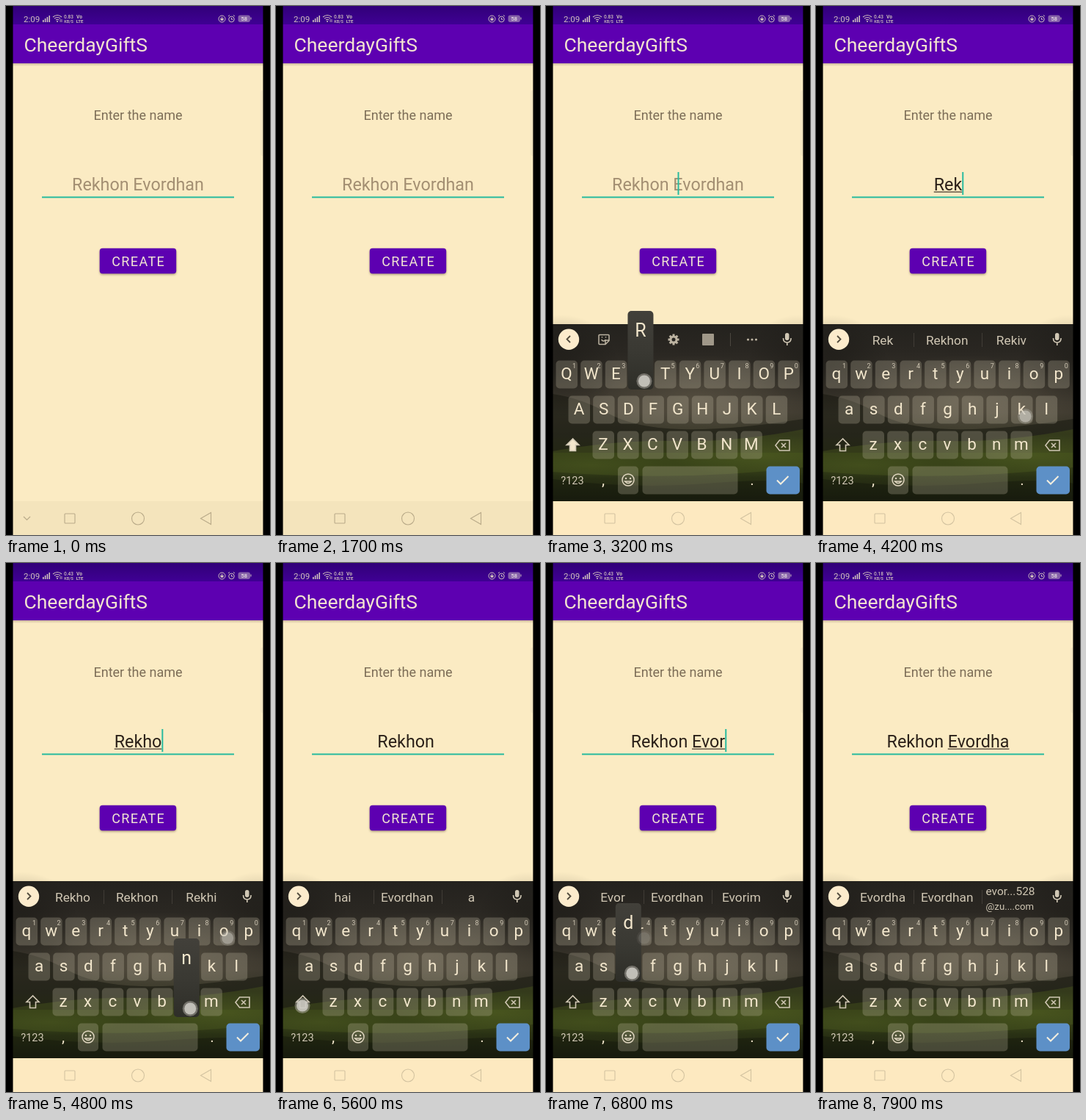
Recreate the animation shown at these times as an HTML page with a canvas. Size 360x720 px, loop 8 s.

```html
<!DOCTYPE html>
<html lang="en">
<head>
<meta charset="utf-8">
<title>Greeting form</title>
<style>
html, body { margin: 0; width: 100%; height: 100%; overflow: hidden; background: #000; }
canvas { display: block; width: 360px; height: 720px; }
</style>
</head>
<body>
<canvas id="stage" width="360" height="720"></canvas>
<script>
const ctx = document.getElementById('stage').getContext('2d');
const LOOP = 8000;
const FONT = 'Roboto, sans-serif';
const CREAM = '#f2e6cc', ICON = '#d0c7b4', TEAL = '#2abb9f', PURPLE = '#5d00b1';
const FIRST = 'Rekhon', LAST = 'Evordhan';
const HINT = FIRST + ' ' + LAST;
const HOLD = 100;
const SLIDE_START = 1750;

// Touch-down times; a letter is committed when its key is released.
const taps = [
  [2750, '⇧'], [3150, 'R'], [3600, 'e'], [4050, 'k'], [4350, 'h'],
  [4600, 'o'], [4780, 'n'], [4950, ' '], [5550, '⇧'], [5850, 'E'],
  [6080, 'v'], [6290, 'o'], [6500, 'r'], [6750, 'd'], [7000, 'h'], [7250, 'a']
].map(([at, key]) => ({ at, key }));

const rows = [['qwertyuiop', 28, 501], ['asdfghjkl', 45, 549], ['zxcvbnm', 78, 597]];
const keys = {};
for (const [letters, x0, y] of rows)
  [...letters].forEach((c, i) => { keys[c] = { x: x0 + i * 33.65, y }; });
keys['⇧'] = { x: 31, y: 593 };
keys[' '] = { x: 196, y: 640 };

function text(s, x, y, size, color, align = 'center', weight = 400) {
  ctx.font = `${weight} ${size}px ${FONT}`;
  ctx.textAlign = align;
  ctx.fillStyle = color;
  ctx.fillText(s, x, y);
}

function rect(x, y, w, h, color) {
  ctx.fillStyle = color;
  ctx.fillRect(x, y, w, h);
}

function band(y, h, color) {
  rect(9, y, 342, h, color);
}

function box(x, y, w, h, r, color) {
  ctx.beginPath();
  ctx.roundRect(x, y, w, h, r);
  ctx.fillStyle = color;
  ctx.fill();
}

function disc(x, y, r, color) {
  ctx.beginPath();
  ctx.arc(x, y, r, 0, 7);
  ctx.fillStyle = color;
  ctx.fill();
}

function ring(x, y, r, color, width = 1) {
  ctx.beginPath();
  ctx.arc(x, y, r, 0, 7);
  ctx.strokeStyle = color;
  ctx.lineWidth = width;
  ctx.stroke();
}

function stroke(path, color, width = 1.5) {
  ctx.strokeStyle = color;
  ctx.lineWidth = width;
  ctx.stroke(new Path2D(path));
}

function shape(path, color) {
  ctx.fillStyle = color;
  ctx.fill(new Path2D(path));
}

function fade(y0, y1, ...stops) {
  const g = ctx.createLinearGradient(0, y0, 0, y1);
  stops.forEach(([at, color]) => g.addColorStop(at, color));
  return g;
}

// Soft elliptical patch that fades out towards its rim.
function glow(x, y, rx, ry, rgb, alpha) {
  ctx.save();
  ctx.translate(x, y);
  ctx.scale(rx, ry);
  const g = ctx.createRadialGradient(0, 0, 0, 0, 0, 1);
  g.addColorStop(0, `rgba(${rgb},${alpha})`);
  g.addColorStop(1, `rgba(${rgb},0)`);
  disc(0, 0, 1, g);
  ctx.restore();
}

function stateAt(t) {
  const s = { value: '', shift: false, changed: 100, popup: null };
  for (const { at, key } of taps) {
    if (t < at) break;
    if (t < at + HOLD) {
      if (key !== '⇧' && key !== ' ') s.popup = key;
      break;
    }
    if (key === '⇧') s.shift = true;
    else {
      s.value += key;
      s.shift = false;
      s.changed = at + HOLD;
    }
  }
  s.cursor = t >= 100 && (t - s.changed) % 1000 < 500;
  return s;
}

function statusBar(t) {
  const ink = '#cfc0bd';
  band(0, 25, fade(0, 25, [0, '#310078'], [1, '#3f0094']));
  text('2:09', 24, 22, 11.5, ink, 'left');
  for (let i = 0; i < 4; i++) rect(50 + i * 2.8, 19 - i * 2, 1.6, 3 + i * 2, ink);
  stroke('M64 15q6-5 12 0M66 17q4-3 8 0M68 19q2-1.5 4 0', ink, 1.1);
  disc(70, 21, 1, ink);
  if (t < 1900 || t > 3700) stroke('M74 18v4m2-4v4', ink, 0.8);
  const speed = t < 3700 ? '0.83' : t < 7400 ? '0.43' : '0.18';
  text(speed, 85.5, 17, 6.5, ink, 'center', 500);
  text('KB/S', 85.5, 23, 5.5, ink, 'center', 500);
  text('Vo', 100, 17, 6.5, ink, 'center', 700);
  text('LTE', 100.5, 23, 6, ink, 'center', 700);
  ring(294.5, 17.5, 4.5, ink);
  box(292.5, 16.8, 4, 3, 0.5, ink);
  ring(294.5, 16.5, 1.3, ink, 0.7);
  ring(307.5, 18, 3.8, ink);
  stroke('M307.5 16v2.2h2M303 14l2-1.6m7 1.6-2-1.6', ink, 1);
  box(316.5, 12.5, 16.5, 9.5, 3, 'rgba(207,192,200,.5)');
  text('58', 324.8, 20, 7.5, '#e6dbe0', 'center', 500);
  rect(333.5, 15.5, 1, 3, ink);
}

function form(s) {
  band(25, 695, '#fbebc3');
  band(78, 4, fade(78, 82, [0, '#cdb99c'], [1, '#fbebc3']));
  band(25, 53, PURPLE);
  text('CheerdayGiftS', 24.5, 62, 26.5, '#f3e4d0', 'left');
  text('Enter the name', 180, 154.5, 18, '#7c6d57');
  box(347.5, 115, 3, 89, [2, 0, 0, 2], '#f1e3bf');

  rect(49, 259.3, 262, 2, TEAL);
  const shown = s.value || HINT;
  ctx.font = `400 23.3px ${FONT}`;
  const width = ctx.measureText(shown).width;
  const left = 180 - width / 2;
  text(shown, left, 251, 23.3, s.value ? '#2b2119' : '#a38f72', 'left');
  const word = s.value.split(' ').pop();
  if (word) {
    const w = ctx.measureText(word).width;
    rect(left + width - w, 252.5, w, 1.2, '#3d3228');
  }
  if (s.cursor) rect(s.value ? left + width : 179.5, 226, 2, 31, TEAL);

  ctx.save();
  ctx.shadowColor = 'rgba(60,40,20,.4)';
  ctx.shadowBlur = 3;
  ctx.shadowOffsetY = 1.5;
  box(127.7, 329.8, 104.5, 34.4, 4, PURPLE);
  ctx.restore();
  ctx.letterSpacing = '1.4px';
  text('CREATE', 180.7, 354.2, 18, '#f3e6d3');
  ctx.letterSpacing = '0px';
}

function navBar(t) {
  const open = t > SLIDE_START;
  band(674, 46, open ? '#fde9c0' : '#f4e4bc');
  const ink = open ? '#d3c3a0' : '#b9aa89';
  if (t < 1500) stroke('M24 695l4.5 4.5 4.5-4.5', ink, 1.2);
  stroke('M81 691h12q1 0 1 1v11q0 1-1 1h-12q-1 0-1-1v-11q0-1 1-1z', ink, 1.1);
  ring(180, 697.5, 8.5, ink, 1.1);
  stroke('M265.5 697.5l14-8v16z', ink, 1.1);
}

function landscape() {
  band(433, 241, fade(433, 674,
    [0, '#24221e'], [0.16, '#2a2722'], [0.32, '#36322a'], [0.5, '#413c31'],
    [0.62, '#353526'], [0.72, '#303816'], [0.84, '#2c3415'], [1, '#1b1f10']));
  glow(205, 535, 150, 60, '118,108,88', 0.4);
  shape('M9 528q40 6 75 26t100 22 167-14v46H9z', 'rgba(30,30,21,.65)');
  shape('M9 606q90-16 170-14t172-16v52q-170 20-342 6z', 'rgba(72,86,30,.45)');
  glow(300, 612, 130, 30, '92,108,38', 0.4);
  glow(60, 625, 100, 18, '86,100,36', 0.3);
  glow(20, 490, 80, 70, '16,15,12', 0.4);
  glow(345, 480, 70, 60, '16,15,12', 0.3);
  shape('M9 644q110 14 210 6t132 0v24H9z', 'rgba(18,21,12,.4)');
}

function mic() {
  box(326, 445, 5.5, 10, 3, ICON);
  stroke('M323.5 452q0 6 5.3 6t5.3-6M328.8 458v4', ICON, 1.6);
}

function toolbar() {
  const ink = '#bdb4a2';
  stroke('M73 447.5q-1 0-1 1v11q0 1 1 1h8l5-5v-7q0-1-1-1zM86 455h-5v5', ink);
  stroke('M75.5 454q3 4 6 0M76.5 450v1.5m5-1.5v1.5', ink, 1.3);
  text('GIF', 126, 458.5, 12.5, ink, 'center', 700);
  ctx.save();
  ctx.translate(174, 454);
  ring(0, 0, 4, ink, 3);
  for (let i = 0; i < 8; i++) {
    ctx.rotate(Math.PI / 4);
    rect(-1.5, -7.5, 3, 3, ink);
  }
  ctx.restore();
  box(213, 446, 16, 16, 1, '#a09889');
  rect(251, 445, 1, 18, 'rgba(220,210,190,.2)');
  [275.5, 281, 286.5].forEach(x => disc(x, 454, 1.6, ink));
}

function suggestions(value) {
  const word = value.split(' ').pop();
  let words;
  if (!word) words = ['hai', LAST, 'a'];
  else if (value.includes(' ')) words = [word, LAST, word.length < 5 ? 'Evorim' : 'Evordi'];
  else words = [word, FIRST, word.length < 4 ? 'Rekiv' : 'Rekhi'];
  [133, 226].forEach(x => rect(x, 445, 1, 19, 'rgba(220,210,190,.14)'));
  if (word.length === 7) {
    text('evor...528', 231.5, 451.5, 15.5, ICON, 'left');
    text('@zu....com', 231.5, 472, 13.2, ICON, 'left');
    words.pop();
  }
  words.forEach((w, i) => text(w, 91 + i * 87.7, 460.5, 17.3, ICON));
}

function keyboard(s) {
  landscape();
  disc(31, 453.7, 14.2, '#fcebcc');
  if (s.value) {
    stroke('M29 449l4.5 4.5-4.5 4.5', '#514a3d', 1.8);
    suggestions(s.value);
  } else {
    stroke('M33 449l-4.5 4.5 4.5 4.5', '#514a3d', 1.8);
    toolbar();
  }
  mic();

  const face = 'rgba(207,200,177,.25)';
  for (const [letters] of rows) {
    [...letters].forEach((c, i) => {
      const { x, y } = keys[c];
      box(x - 14.5, y - 18.5, 29.5, 38, 5, face);
      text(s.shift ? c.toUpperCase() : c, x, y + 7, 22.5, CREAM);
      if (y === 501) text((i + 1) % 10, x + 10.5, y - 8, 9, ICON);
    });
  }

  const arrow = 'M36.5 589l-8.5 8.5h4.5v8h8v-8h4.5z';
  if (s.shift) shape(arrow, CREAM);
  stroke(arrow, ICON, 1.6);
  stroke('M318.5 591h13.5v14h-13.5l-5.5-7zM321 595l6 6m0-6l-6 6', ICON, 1.6);

  text('?123', 36, 650.5, 14.5, ICON);
  text(',', 78, 652, 21, CREAM);
  box(98, 626.5, 28, 38, 5, face);
  ring(112, 645, 8, '#e2d8c2', 1.5);
  disc(109, 643, 1.2, '#e2d8c2');
  disc(115, 643, 1.2, '#e2d8c2');
  stroke('M107.5 647q4.5 5 9 0z', '#e2d8c2', 1.4);
  box(131.5, 626.5, 130, 38, 5, face);
  text('.', 281, 652, 21, CREAM);
  box(300.5, 626.5, 45.5, 38, 5, '#5d90c7');
  stroke('M315 645.5l5 5 10.5-10.5', '#f5efdf', 2);

  if (s.popup) {
    const { x, y } = keys[s.popup.toLowerCase()];
    const left = Math.min(Math.max(x - 17.5, 11), 314);
    const top = y - 86;
    box(left, top, 35, 107, 5, fade(top, top + 107, [0, '#42403a'], [0.5, '#3a3933'], [1, '#2e2e28']));
    text(s.popup, left + 17.5, y - 51, 25, CREAM);
  }
}

function touch(t, at, x, y) {
  const age = t - at;
  if (age < 0 || age > 350) return;
  ctx.globalAlpha = age < HOLD ? 0.85 : 0.75 * (1 - (age - HOLD) / 250);
  disc(x, y, 10.5, 'rgba(190,187,178,.55)');
  disc(x, y, 8, '#cfcdc5');
  ctx.globalAlpha = 1;
}

function draw(t) {
  const s = stateAt(t);
  form(s);
  statusBar(t);
  if (t > SLIDE_START) {
    const left = 1 - Math.min((t - SLIDE_START) / 250, 1);
    ctx.save();
    ctx.translate(0, 241 * left ** 2);
    keyboard(s);
    ctx.restore();
  }
  navBar(t);
  touch(t, 1300, 182, 246);
  for (const { at, key } of taps) {
    const { x, y } = keys[key.toLowerCase()];
    touch(t, at, x + 5, y + 9.5);
  }
  // Black bezel on both sides of the screen.
  rect(0, 0, 9.5, 720, '#000');
  rect(350.5, 0, 9.5, 720, '#000');
}

function tick() {
  draw(performance.now() % LOOP);
  requestAnimationFrame(tick);
}
tick();
</script>
</body>
</html>
```
